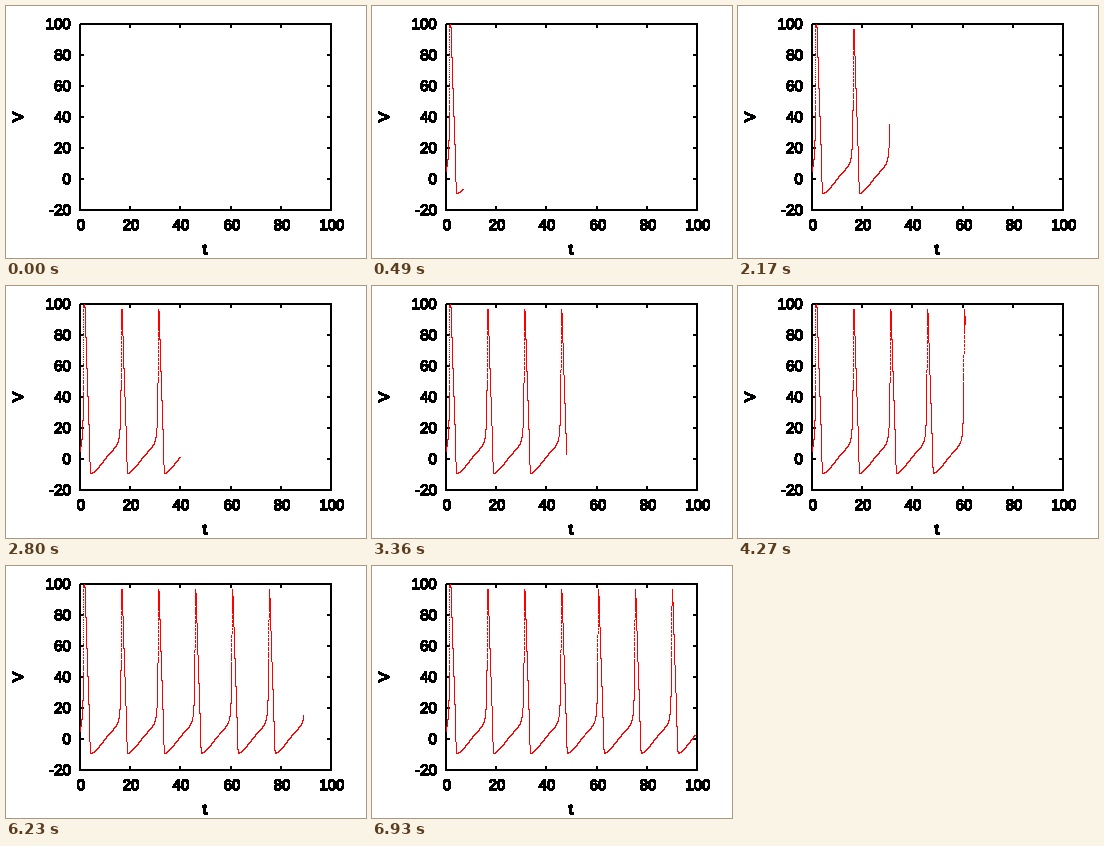
Write a matplotlib script that moves like this. It is 360 px wide and 252 px high and loops after 7000 ms.

```python
import numpy as np
import matplotlib.pyplot as plt
from matplotlib.animation import FuncAnimation
from matplotlib.patches import Rectangle
from matplotlib.patheffects import withStroke

W, H, DPI = 360, 252, 72
LEFT, RIGHT, TOP, BOTTOM = 74, 325, 18, 204
FRAMES, INTERVAL = 100, 70
DT = 0.004

plt.rcParams["font.family"] = "Liberation Sans"


def rates(v):
    """Hodgkin-Huxley opening and closing rates for the m, h and n gates."""
    x, y = 25 - v + 1e-9, 10 - v + 1e-9
    alpha = np.array([0.1 * x / np.expm1(x / 10),
                      0.07 * np.exp(-v / 20),
                      0.01 * y / np.expm1(y / 10)])
    beta = np.array([4 * np.exp(-v / 18),
                     1 / (np.exp((30 - v) / 10) + 1),
                     0.125 * np.exp(-v / 80)])
    return alpha, beta


def simulate(v, current=10.0):
    """Integrate many start voltages at once; gates begin at rest."""
    a, b = rates(np.zeros_like(v))
    gates = a / (a + b)
    trace = [v]
    for _ in range(round(100 / DT)):
        m, h, n = gates
        dv = (current - 120 * m * m * m * h * (v - 115)
              - 36 * (n * n) ** 2 * (v + 12) - 0.3 * (v - 10.6))
        a, b = rates(v)
        gates = gates + DT * (a * (1 - gates) - b * gates)
        v = v + DT * dv
        trace.append(v)
    return np.array(trace)


def spiking_trace():
    """Pick the start voltage whose third spike passes 35 mV at t = 31."""
    runs = simulate(np.linspace(0, 16, 81))
    first, last = round(25 / DT), round(38 / DT)
    crossing = first + np.argmax(runs[first:last] > 35, axis=0)
    return runs[:, np.argmin(abs(crossing * DT - 31))]


fig = plt.figure(figsize=(W / DPI, H / DPI), dpi=DPI, facecolor="white")
ax = fig.add_axes([0, 0, 1, 1])
ax.set_xlim(0, W)
ax.set_ylim(H, 0)
ax.axis("off")


def stroke(x, y):
    ax.plot(x, y, color="black", lw=2, antialiased=False,
            solid_capstyle="butt", solid_joinstyle="miter")


def label(x, y, text, ha="center", **kw):
    ax.text(x, y, text, ha=ha, va="baseline", fontsize=15, color="black",
            antialiased=False,
            path_effects=[withStroke(linewidth=0.4, foreground="black")], **kw)


stroke([LEFT, RIGHT, RIGHT, LEFT, LEFT], [TOP, TOP, BOTTOM, BOTTOM, TOP])
for t in range(0, 101, 20):
    x = round(LEFT + t * (RIGHT - LEFT) / 100)
    stroke([x, x], [TOP, TOP + 4])
    stroke([x, x], [BOTTOM, BOTTOM - 4])
    label(x + 1, 224, str(t))
for v in range(-20, 101, 20):
    y = round(TOP + (100 - v) * (BOTTOM - TOP) / 120)
    stroke([LEFT, LEFT + 4], [y, y])
    stroke([RIGHT, RIGHT - 4], [y, y])
    label(65, y + 5, str(v), ha="right")
label(199, 248, "t")
label(17, 111, "V", rotation=90, rotation_mode="anchor")

# One single-pixel dot per integration step.
voltage = spiking_trace()
xs = 73.1 + 2.52 * DT * np.arange(len(voltage))
ys = 17.5 + 1.55 * (100 - voltage)

curve, = ax.plot([], [], ",", color="red", antialiased=False, zorder=5)
curve.set_clip_path(Rectangle((LEFT, TOP), RIGHT - LEFT, BOTTOM - TOP,
                              transform=ax.transData))


def update(frame):
    end = round(frame / DT) + 1 if frame else 0
    curve.set_data(xs[:end], ys[:end])
    return curve,


anim = FuncAnimation(fig, update, frames=FRAMES, interval=INTERVAL,
                     repeat=True, repeat_delay=0)
plt.show()
```
